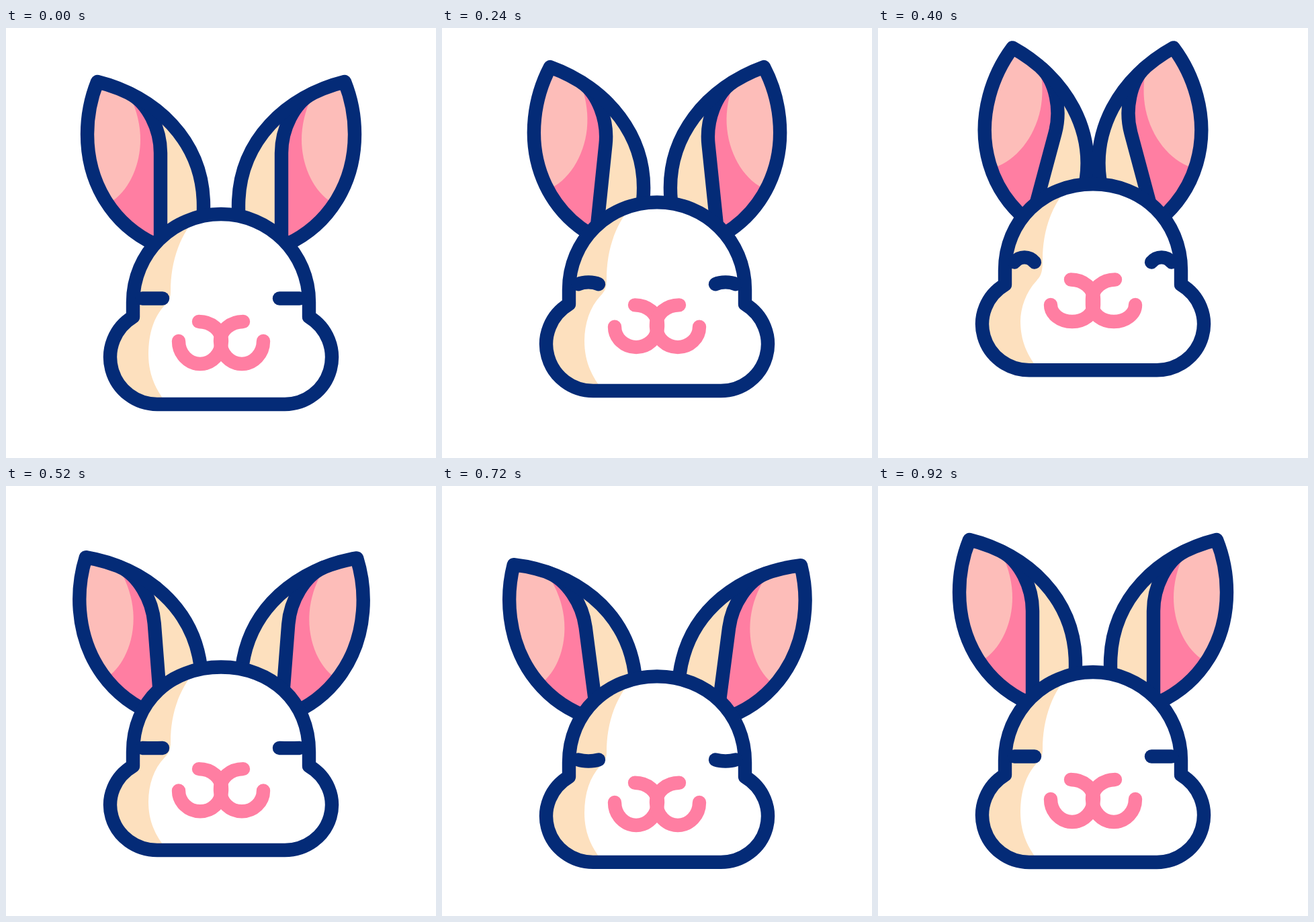
Animation of 640 by 640 pixels, one loop 1.48 s. Source, as an HTML page:

```html
<!DOCTYPE html>
<html lang="en">
<head>
<meta charset="utf-8">
<title>Hopping rabbit</title>
<style>
html, body { margin: 0; height: 100%; overflow: hidden; background: #fff; }
svg { display: block; width: 100vw; height: 100vh; }
.line { fill: none; stroke: #042b77; stroke-width: 20.4; stroke-linecap: round; stroke-linejoin: round; }
.pink { stroke: #ff7ea2; }
</style>
</head>
<body>
<svg viewBox="0 0 640 640">
  <defs>
    <g id="ear">
      <path fill="#fde0be" d="M136 80C126 105 121 130 121 158C121 230 158 292 222 322L250 335L294 300V265C294 167 221 101 136 80Z"/>
      <path fill="#ff7ea2" d="M136 80C126 105 121 130 121 158C121 230 158 292 222 322H230V186C230 150 211 112 185 98Z"/>
      <path fill="#fdbdb9" d="M136 80C126 105 121 130 121 158C121 196 131 231 151 262C180 247 200 208 200 166C200 145 195 125 186 104Z"/>
      <path class="line" d="M230 320V186C230 150 211 112 185 98"/>
      <path class="line" d="M250 335L222 322C158 292 121 230 121 158C121 130 126 105 136 80C221 101 294 167 294 265V300"/>
    </g>
    <g id="half">
      <path id="eye" class="line"/>
      <path id="mouth" class="line pink"/>
    </g>
  </defs>
  <use id="earL" href="#ear"/>
  <g transform="matrix(-1 0 0 1 640 0)"><use id="earR" href="#ear"/></g>
  <path id="skin" fill="#fde0be"/>
  <path id="white" fill="#fff"/>
  <path id="outline" class="line"/>
  <use href="#half"/>
  <use href="#half" transform="matrix(-1 0 0 1 640 0)"/>
</svg>
<script>
const LOOP = 1480, STEP = 40;
const $ = id => document.getElementById(id);

// earL and earR are vertical offsets, inL and inR shift the ears towards the middle
const rest = { base: 560, squash: 1, crease: 0, eye: 402.5, bend: 0, nose: 437, lip: 466, chin: 500,
  tilt: 0, earL: 0, earR: 0, inL: 0, inR: 0 };
const peak = { base: 509.3, squash: .979, crease: 11, eye: 348.5, bend: -9.5, nose: 374.5, lip: 412, chin: 437,
  tilt: 15, earL: -37.6, earR: -37.6, inL: 1.5, inR: 1.5 };
const land = { base: 559.8, squash: .954, crease: 0, eye: 412.5, bend: 5.5, nose: 446.5, lip: 476, chin: 510,
  tilt: -15, earL: 50, earR: 52, inL: 0, inR: -1.5 };

// start, end, poses, horizontal handles of the easing curve
const moves = [
  [0, 400, rest, peak, .7, .72],
  [400, 600, peak, land, .333, .667],
  [600, 920, land, rest, .33, .33]
];

// cubic-bezier(a, 0, b, 1)
function ease(x, a, b) {
  let lo = 0, hi = 1;
  for (let i = 0; i < 24; i++) {
    const t = (lo + hi) / 2, r = 1 - t;
    if (3 * a * t * r * r + 3 * b * t * t * r + t * t * t < x) lo = t; else hi = t;
  }
  return lo * lo * (3 - 2 * lo);
}

function poseAt(ms) {
  const move = moves.find(m => ms < m[1]);
  if (!move) return rest;
  const [start, end, from, to, a, b] = move;
  const k = ease((ms - start) / (end - start), a, b);
  const pose = {};
  for (const key in from) pose[key] = from[key] + (to[key] - from[key]) * k;
  return pose;
}

function draw(p) {
  const y = v => p.base - (560 - v) * p.squash;
  const pt = (x, v) => `${x} ${y(v)} `;
  const curve = (...c) => 'C' + c.map(q => pt(...q)).join('');
  const cheek = (x, v) => `A70 ${70 * p.squash} 0 0 1 ${pt(x, v)}`;

  // the dome gets squarer when squashed
  const h = 72.3 / p.squash, side = y(408), top = y(277);
  const dome = `V${side}C189 ${side - h} ${320 - h} ${top} 320 ${top}`
    + `C${320 + h} ${top} 451 ${side - h} 451 ${side}`;
  const right = `V${y(430)}${cheek(415, 560)}`;
  const head = `M${pt(225, 560)}${cheek(189, 430)}${dome}${right}Z`;
  $('skin').setAttribute('d', head);
  $('outline').setAttribute('d', head);

  const c = p.crease;
  $('white').setAttribute('d', `M320 ${top}C${320 + h} ${top} 451 ${side - h} 451 ${side}${right}`
    + `L${pt(240, 560)}`
    + curve([222, 538], [212, 515], [212, 485])
    + curve([212, 455 + c], [220, 430 + c], [236, 413 + c])
    + curve([242, 406 + c], [245, 402 + c], [245, 392])
    + curve([245, 352], [256, 313], [282, 283]) + 'Z');

  const bow = p.eye + p.bend;
  $('eye').setAttribute('d', `M203 ${p.eye}C211 ${bow} 225 ${bow} 233 ${p.eye}`);
  $('mouth').setAttribute('d', `M287 ${p.nose}A34 29 0 0 1 321 ${p.nose + 29}V${p.lip}A32 ${p.chin - p.lip} 0 0 1 257 ${p.lip}`);

  for (const s of 'LR')
    $('ear' + s).setAttribute('transform', `translate(${p['in' + s]} ${p['ear' + s]}) rotate(${p.tilt} 217 312)`);
}

const began = performance.now();
function tick() {
  const ms = (performance.now() - began) % LOOP;
  draw(poseAt(Math.floor(ms / STEP) * STEP));
  requestAnimationFrame(tick);
}
tick();
</script>
</body>
</html>
```
